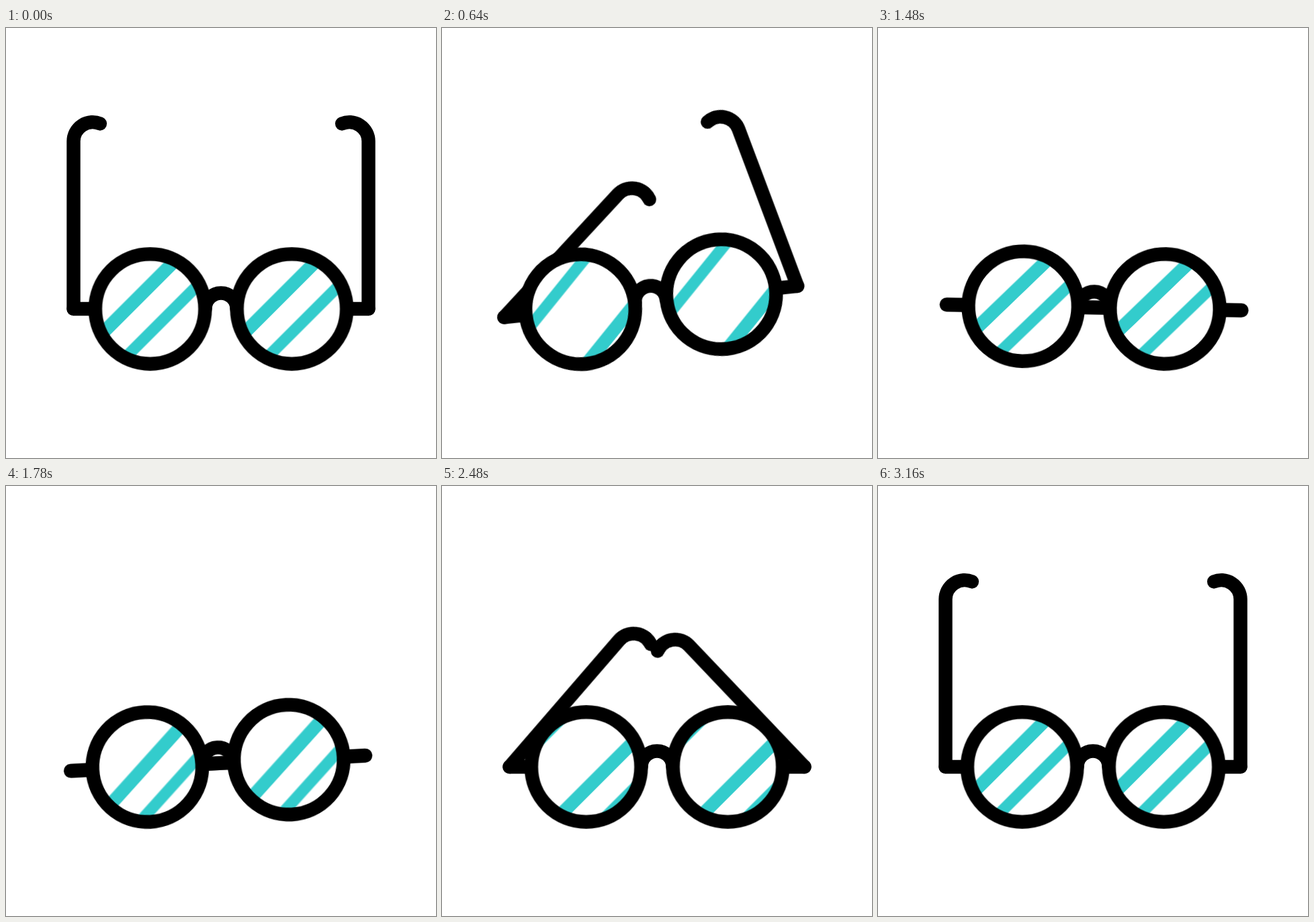
Recreate the animation shown at these times as an HTML page without scripts. Size 640 by 640 pixels, loop 3.6 s.

```html
<!DOCTYPE html>
<html lang="en">
<head>
<meta charset="utf-8">
<title>Glasses</title>
<style>
  html, body { margin: 0; width: 100%; height: 100%; overflow: hidden; background: #fff; }
  svg { display: block; width: 100%; height: 100%; }

  .ink { fill: none; stroke: #000; stroke-width: 20.4; stroke-linecap: round; stroke-linejoin: round; }
  .glass { fill: #fff; }
  /* one wide dashed line gives the repeating pair of bands */
  .bands { fill: none; stroke: #33cccc; stroke-width: 170; stroke-dasharray: 19.5 31.5 17 82; }

  .rock-l, .rock-r, .arm-l, .arm-r, .bands {
    animation: 3600ms cubic-bezier(.333, 0, .667, 1) infinite;
  }
  /* the frame rocks on the bottom of one lens, then the other */
  .rock-l { transform-origin: 214.5px 499.7px; animation-name: rock-l; }
  .rock-r { transform-origin: 425.5px 499.7px; animation-name: rock-r; }
  .arm-l, .arm-r { transform-origin: 100.5px 418px; }
  .arm-l { animation-name: arm-l; }
  .arm-r { animation-name: arm-r; }
  .bands { animation-name: shine; }

  @keyframes rock-l {
    0% { transform: rotate(0deg); }
    14.444% { transform: rotate(-8deg); animation-timing-function: cubic-bezier(.333, 0, .667, .5); }
    22.222% { transform: rotate(0deg); }
    42.492% { transform: rotate(0deg); animation-timing-function: cubic-bezier(.333, .568, .667, 1); }
    49.028% { transform: rotate(-3deg); animation-timing-function: cubic-bezier(.333, 0, .667, .536); }
    56.067%, 100% { transform: rotate(0deg); }
  }
  @keyframes rock-r {
    0% { transform: rotate(0deg); }
    22.222% { transform: rotate(0deg); animation-timing-function: cubic-bezier(.333, .5, .667, 1); }
    30% { transform: rotate(8deg); animation-timing-function: cubic-bezier(.333, 0, .667, .593); }
    42.492% { transform: rotate(0deg); }
    56.067% { transform: rotate(0deg); animation-timing-function: cubic-bezier(.333, .531, .667, 1); }
    61.444% { transform: rotate(2deg); }
    68.333%, 100% { transform: rotate(0deg); }
  }
  @keyframes arm-l {
    0%, 8.611% { transform: rotate(0deg); }
    26%, 56.25% { transform: rotate(90deg); }
    80.556% { transform: rotate(-2.4deg); }
    87.222%, 100% { transform: rotate(0deg); }
  }
  @keyframes arm-r {
    0% { transform: rotate(0deg); }
    13.056% { transform: rotate(0deg); animation-timing-function: linear; }
    17.778% { transform: rotate(14.4deg); animation-timing-function: cubic-bezier(.333, .15, .667, 1); }
    28.611%, 58.25% { transform: rotate(90deg); }
    80.139% { transform: rotate(-6.5deg); }
    87.222%, 100% { transform: rotate(0deg); }
  }
  @keyframes shine {
    0%, .417% { transform: translateX(0); }
    32.917%, 42.361% { transform: translateX(150px); }
    86%, 100% { transform: translateX(450px); }
  }
</style>
</head>
<body>
<svg viewBox="0 0 640 640">
  <defs>
    <clipPath id="rim"><circle r="74"/></clipPath>
    <path id="arm" class="ink" d="M100.5 418V168.5A28.5 28.5 0 0 1 140 142.4"/>
    <path id="stub" class="ink" d="M100.5 418H132"/>
    <circle id="glass" class="glass" r="81.7"/>
    <circle id="ring" class="ink" r="81.7"/>
  </defs>
  <g class="rock-l">
    <g class="rock-r">
      <g class="arm-l"><use href="#arm"/></g>
      <use href="#stub"/>
      <g transform="translate(640) scale(-1 1)">
        <g class="arm-r"><use href="#arm"/></g>
        <use href="#stub"/>
      </g>
      <path class="ink" d="M296.5 418A23.5 23.5 0 0 1 343.5 418"/>
      <g transform="translate(214.6 418.2)">
        <use href="#glass"/>
        <g clip-path="url(#rim)" transform="rotate(45)"><path class="bands" d="M-484.5 0H115"/></g>
        <use href="#ring"/>
      </g>
      <g transform="translate(425.4 418.2)">
        <use href="#glass"/>
        <g clip-path="url(#rim)" transform="rotate(45)"><path class="bands" d="M-484.5 0H115"/></g>
        <use href="#ring"/>
      </g>
    </g>
  </g>
</svg>
</body>
</html>
```
